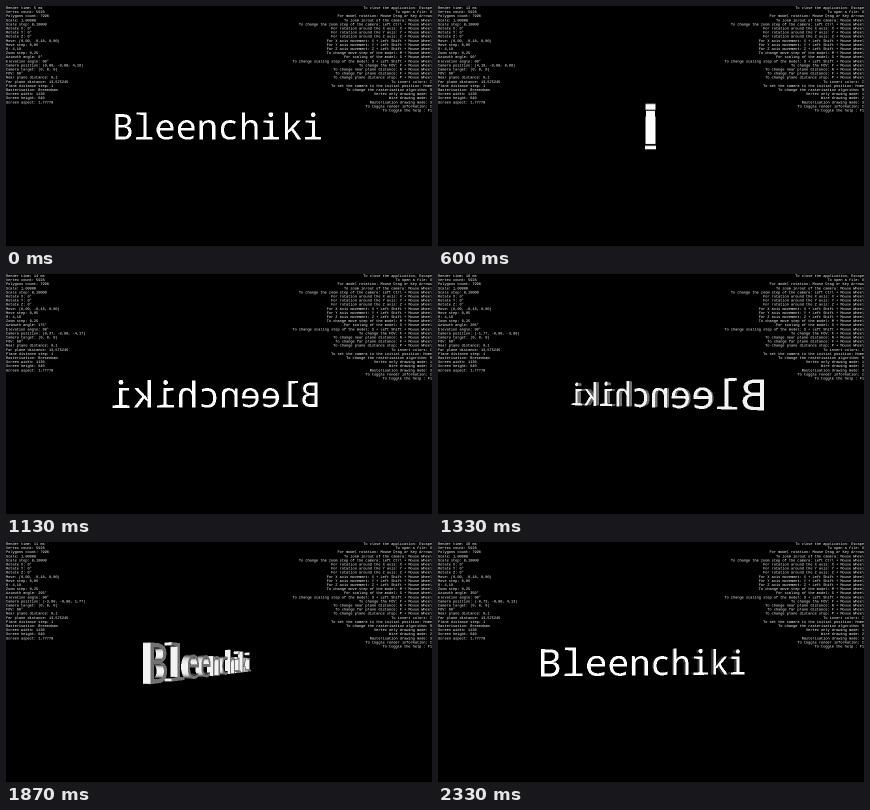
Write an HTML page with a canvas that moves like this. It is 426x240 px and loops after 2.39 s.

```html
<!DOCTYPE html>
<html lang="en">
<head>
<meta charset="utf-8">
<title>Rotating text</title>
<style>
html, body { margin: 0; width: 100%; height: 100%; overflow: hidden; background: #000; }
canvas { display: block; width: 426px; height: 240px; }
</style>
</head>
<body>
<canvas id="stage" width="852" height="480"></canvas>
<script>
const SCALE = 2;            // canvas pixels per stage pixel
const LOOP = 2390;
const CAMERA = 227;         // camera distance and focal length, in stage pixels
const DEPTH = 3;            // half thickness of the letters
const MASK_SCALE = 4, PAD = 6;
const ctx = document.getElementById('stage').getContext('2d');

// The word as a flat mask; rays are marched through its extrusion.
const word = makeMask('Bleenchiki');
function makeMask(text) {
  const canvas = document.createElement('canvas');
  const g = canvas.getContext('2d');
  const font = `${34.7 * MASK_SCALE}px "Noto Sans Mono", monospace`;
  g.font = font;
  const m = g.measureText(text);
  const width = m.actualBoundingBoxLeft + m.actualBoundingBoxRight;
  const height = m.actualBoundingBoxAscent + m.actualBoundingBoxDescent;
  canvas.width = Math.ceil(width) + 2 * PAD;
  canvas.height = Math.ceil(height) + 2 * PAD;
  g.font = font;
  g.fillText(text, PAD + m.actualBoundingBoxLeft, PAD + m.actualBoundingBoxAscent);
  const data = g.getImageData(0, 0, canvas.width, canvas.height).data;
  return {
    halfWidth: width / 2 / MASK_SCALE,
    halfHeight: height / 2 / MASK_SCALE,
    alpha: (px, py) => data[(py * canvas.width + px) * 4 + 3] || 0
  };
}
const maskX = x => Math.floor((x + word.halfWidth) * MASK_SCALE) + PAD;
const maskY = y => Math.floor((y + word.halfHeight) * MASK_SCALE) + PAD;

// Horizontal part of the outward normal at the letter's edge.
function edgeNormalX(px, py) {
  let nx = 0, ny = 0;
  for (let j = -2; j <= 2; j++)
    for (let i = -2; i <= 2; i++) {
      const a = word.alpha(px + i, py + j);
      nx -= i * a;
      ny -= j * a;
    }
  return nx / (Math.hypot(nx, ny) || 1);
}

// Brightness seen along one ray, with parallel light along the view axis; 0 for a miss.
function trace(sx, sy, sin, cos) {
  const ox = CAMERA * sin, oz = CAMERA * cos;
  const dx = sx * cos - CAMERA * sin, dz = -sx * sin - CAMERA * cos;
  const span = (o, d, half) => {
    if (Math.abs(d) < 1e-6) return Math.abs(o) <= half ? [-1e9, 1e9] : [1, 0];
    const a = (-half - o) / d, b = (half - o) / d;
    return [Math.min(a, b), Math.max(a, b)];
  };
  const [x0, x1] = span(ox, dx, word.halfWidth);
  const [y0, y1] = span(0, sy, word.halfHeight);
  const [z0, z1] = span(oz, dz, DEPTH);
  const start = Math.max(x0, y0, z0), end = Math.min(x1, y1, z1);
  if (start > end) return 0;
  const step = 0.25 / Math.hypot(dx, sy, dz);
  for (let t = start; t <= end; t += step) {
    const px = maskX(ox + dx * t), py = maskY(sy * t);
    if (word.alpha(px, py) < 128) continue;
    return t === z0 ? Math.abs(cos) : Math.max(0, edgeNormalX(px, py) * sin);
  }
  return 0;
}

function drawWord(azimuth) {
  const sin = Math.sin(azimuth), cos = Math.cos(azimuth);
  const halfW = 125 * SCALE, halfH = 32 * SCALE;
  const image = ctx.createImageData(2 * halfW, 2 * halfH);
  for (let y = 0, k = 0; y < 2 * halfH; y++)
    for (let x = 0; x < 2 * halfW; x++, k += 4) {
      const light = trace((x + 0.5 - halfW) / SCALE, (y + 0.5 - halfH) / SCALE, sin, cos);
      image.data.fill(255 * Math.min(1, 1.05 * light), k, k + 3);
      image.data[k + 3] = 255;
    }
  ctx.putImageData(image, 212.5 * SCALE - halfW, 120 * SCALE - halfH);
}

const help = [
  'To close the application: Escape',
  'To open a file: O',
  'For model rotation: Mouse Drag or Key Arrows',
  'To zoom in/out of the camera: Mouse Wheel',
  'To change the zoom step of the camera: Left Ctrl + Mouse Wheel',
  ...['X', 'Y', 'Z'].map(a => `For rotation around the ${a} axis: ${a} + Mouse Wheel`),
  ...['X', 'Y', 'Z'].map(a => `For ${a} axis movement: ${a} + Left Shift + Mouse Wheel`),
  'To change move step of the model: M + Mouse Wheel',
  'For scaling of the model: S + Mouse Wheel',
  'To change scaling step of the model: S + Left Shift + Mouse Wheel',
  'To change the FOV: F + Mouse Wheel',
  'To change near plane distance: N + Mouse Wheel',
  'To change far plane distance: F + Mouse Wheel',
  'To change plane distance step: P + Mouse Wheel',
  'To invert colors: I',
  'To set the camera to the initial position: Home',
  'To change the rasterisation algorithm: R',
  'Vertex only drawing mode: 1',
  'Wire drawing mode: 2',
  'Rasterisation drawing mode: 3',
  'To toggle render information: I',
  'To toggle the help : F1'
];

function info(step, degrees, azimuth) {
  const num = v => v.toFixed(2).replace('.', ',');
  const x = num(4.19 * Math.sin(azimuth)), z = num(4.19 * Math.cos(azimuth));
  return [
    `Render time: ${step ? 10 + step * 7 % 5 : 5} ms`,
    'Vertex count: 5928', 'Polygons count: 7996',
    'Scale: 1,00000', 'Scale step: 0,10000',
    'Rotate X: 0°', 'Rotate Y: 0°', 'Rotate Z: 0°',
    'Move: (0,00, -0,18, 0,00)', 'Move step: 0,05',
    'R: 4,19', 'Zoom step: 0,25',
    `Azimuth angle: ${degrees}°`, 'Elevation angle: 90°',
    `Camera position: (${x}, -0,00, ${z})`,
    'Camera target: (0, 0, 0)', 'FOV: 60°',
    'Near plane distance: 0,1', 'Far plane distance: 13,575245',
    'Plane distance step: 1', 'Rasterisation: Bresenham',
    'Screen width: 1136', 'Screen height: 640', 'Screen aspect: 1,77778'
  ];
}

function drawLines(lines, x, align) {
  ctx.textAlign = align;
  lines.forEach((line, i) => ctx.fillText(line, x * SCALE, (2.1 + 4.1 * i) * SCALE));
}

// Azimuth by step, turned by hand in 5° increments.
const turns = [[0, 0], [9, 90], [14, 140], [20, 205], [24, 250], [31, 325], [35, 350], [36, 360]];
function azimuthAt(step) {
  const i = turns.findIndex(([s]) => s > step);
  const [s0, a0] = turns[i - 1], [s1, a1] = turns[i];
  return Math.round((a0 + (a1 - a0) * (step - s0) / (s1 - s0)) / 5) * 5;
}

let shown = -1;
function tick() {
  const step = Math.min(35, Math.floor((performance.now() % LOOP + 4) * 0.015));
  if (step !== shown) {
    shown = step;
    const degrees = azimuthAt(step), azimuth = degrees * Math.PI / 180;
    ctx.fillStyle = '#000';
    ctx.fillRect(0, 0, 852, 480);
    drawWord(azimuth);
    ctx.fillStyle = '#fff';
    ctx.font = `${3.58 * SCALE}px "Liberation Mono", monospace`;
    ctx.textBaseline = 'middle';
    drawLines(info(step, degrees, azimuth), 0, 'left');
    drawLines(help, 426, 'right');
  }
  requestAnimationFrame(tick);
}
tick();
</script>
</body>
</html>
```
